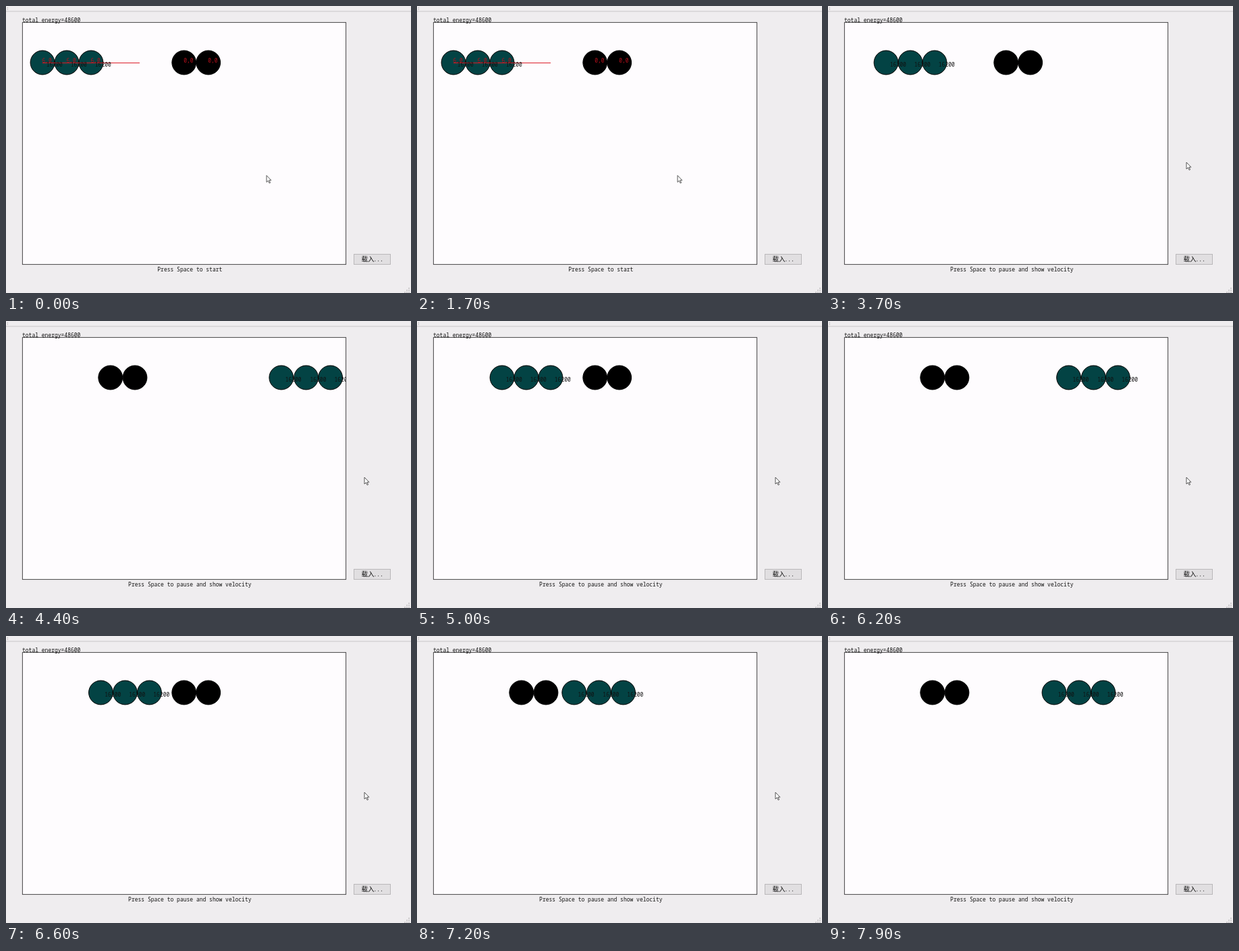
An HTML page that plays this animation: 600x426 px, repeating every 8 s.

```html
<!DOCTYPE html>
<html lang="en">
<head>
<meta charset="utf-8">
<title>Colliding balls</title>
<style>
  html, body { margin: 0; width: 100%; height: 100%; overflow: hidden; background: #efedef; }
  svg { display: block; width: 600px; height: 426px; }
  text { font: 8px "Noto Sans Mono", "Liberation Mono", monospace; fill: #111; }
  .cjk { font: 9.6px "Noto Sans CJK SC", "Noto Sans CJK", sans-serif; }
  .velocity { fill: #b8101c; }
  .crisp { shape-rendering: crispEdges; }
</style>
</head>
<body>
<svg viewBox="0 0 600 426">
  <defs><clipPath id="arena"><rect x="24" y="24" width="480" height="360"/></clipPath></defs>
  <rect width="600" height="426" fill="#efedef"/>
  <rect y="7.5" width="600" height="1" fill="#c8c6c8"/>
  <path d="M2.5 2v1.2m0 1.2v1.2" stroke="#aaa8aa"/>

  <rect x="24.4" y="24.4" width="479.2" height="359.2" fill="#fefcfe" stroke="#484648"/>
  <text x="24" y="23.6">total energy=48600</text>
  <text id="hint" x="272.3" y="393.5" text-anchor="middle"></text>

  <rect class="crisp" x="515.5" y="368.5" width="54" height="15" fill="#e1dfe1" stroke="#bab8ba"/>
  <text class="cjk" x="526.5" y="379.2">载入</text>
  <text x="544.5" y="379">...</text>
  <path d="M596 419h2m-5 3h2m1 0h2m-8 3h2m1 0h2m1 0h2" stroke="#c2c0c2" stroke-width="1.6"/>

  <g clip-path="url(#arena)">
    <g id="balls" stroke="#000"></g>
    <g id="arrows" class="crisp" stroke="#dc1c28"></g>
    <g id="labels"></g>
  </g>
  <path id="cursor" d="M.5.5v10l2.4-2.2 1.7 3.7 1.5-.7-1.7-3.6h3z" fill="#fff" stroke="#444" stroke-width=".9"/>
</svg>
<script>
const LOOP = 8000, STEP = 100, START = 3700;
const ROW = 84, RADIUS = 17.9;
const NEAR = 0.5, FAR = 296, HIT = 114;   // turning points and impact of the moving trio
const REST = [154.75, 191, 0, 263.75, 299.75];
const TRAVEL = [[3700, 44], [5000, 508], [7900, 1553]];
const CURSOR_X = [[1700, 385.5], [2500, 530.5], [7600, 530.5], [7800, 555]];
const CURSOR_Y = [[1700, 251], [2500, 231.5], [7600, 231.5], [7800, 160]];
const CURSOR_EXIT = 7900;

const byId = id => document.getElementById(id);
const show = (el, visible) => el.setAttribute('visibility', visible ? 'visible' : 'hidden');

function add(parent, tag, attrs, content = '') {
  const el = document.createElementNS('http://www.w3.org/2000/svg', tag);
  for (const name in attrs) el.setAttribute(name, attrs[name]);
  el.textContent = content;
  return byId(parent).appendChild(el);
}

const balls = REST.map(() => ({
  disc: add('balls', 'circle', { cy: ROW, r: RADIUS }),
  arrow: add('arrows', 'line', { y1: ROW + 0.5, y2: ROW + 0.5 }),
  energy: add('labels', 'text', { y: 89.7 }, '16200'),
  velocity: add('labels', 'text', { y: 84, class: 'velocity' })
}));

// Piecewise linear, held at both ends; ease shapes each piece
function interpolate(table, t, ease = p => p) {
  let i = 1;
  while (i < table.length - 1 && t > table[i][0]) i++;
  const [t0, a] = table[i - 1], [t1, b] = table[i];
  const p = Math.min(1, Math.max(0, (t - t0) / (t1 - t0)));
  return a + (b - a) * ease(p);
}

const smooth = p => p * p * (3 - 2 * p);

// Distance along the track, folded back and forth between the walls
function trackPosition(t) {
  if (t < START) return 12;
  const span = FAR - NEAR;
  const d = (interpolate(TRAVEL, t) - NEAR) % (2 * span);
  return NEAR + (d < span ? d : 2 * span - d);
}

function placeBall(ball, x, moving, paused) {
  ball.disc.setAttribute('cx', x);
  ball.disc.setAttribute('fill', moving ? '#034344' : '#000');
  ball.arrow.setAttribute('x1', x);
  ball.arrow.setAttribute('x2', x + 72);
  ball.energy.setAttribute('x', x + 5.8);
  ball.velocity.setAttribute('x', x - 0.5);
  ball.velocity.textContent = moving ? '6,0' : '0,0';
  show(ball.arrow, moving && paused);
  show(ball.energy, moving);
  show(ball.velocity, paused);
}

function draw(now) {
  const t = Math.floor(now % LOOP / STEP) * STEP;
  const paused = t < START;
  const u = trackPosition(t);
  const first = u < HIT ? 0 : 2;
  const lead = u + (first ? HIT : 42);

  balls.forEach((ball, i) => {
    const k = i - first, moving = k >= 0 && k < 3;
    const gap = first && k > 0 ? 0.8 : 0;
    placeBall(ball, moving ? lead + 36 * k + gap : REST[i], moving, paused);
  });

  byId('hint').textContent = paused ? 'Press Space to start' : 'Press Space to pause and show velocity';

  const x = interpolate(CURSOR_X, t, smooth), y = interpolate(CURSOR_Y, t, smooth);
  byId('cursor').setAttribute('transform', `translate(${x} ${y})`);
  show(byId('cursor'), t < CURSOR_EXIT);
}

const begin = performance.now();
function tick() {
  draw(performance.now() - begin);
  requestAnimationFrame(tick);
}
tick();
</script>
</body>
</html>
```
